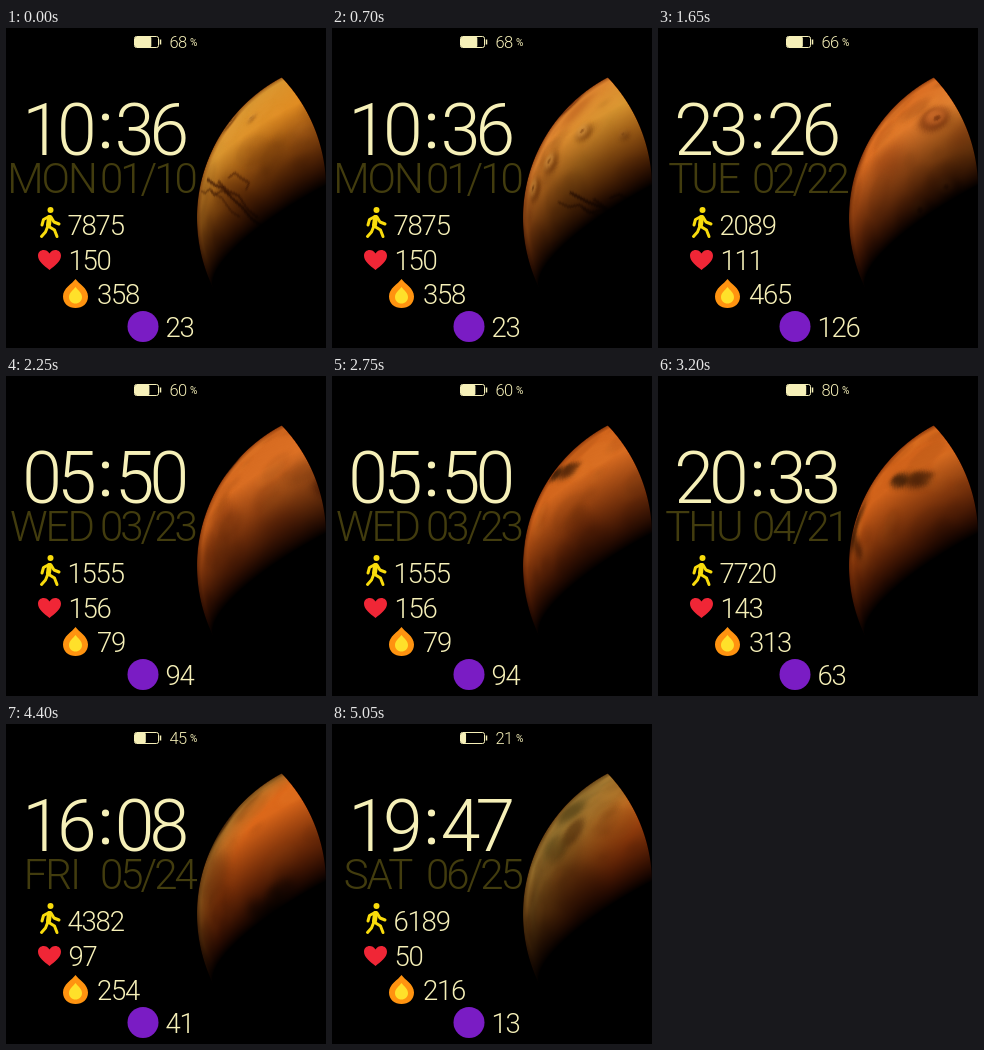
Animation of 320x320 px, one loop 5.1 s. Source, as an HTML page with a canvas:

```html
<!DOCTYPE html>
<html lang="en">
<head>
<meta charset="utf-8">
<title>Watch face</title>
<style>
  html, body { margin: 0; width: 100%; height: 100%; overflow: hidden; background: #000; }
  canvas, svg { position: absolute; left: 0; top: 0; width: 100%; height: 100%; }
  text { font-family: Roboto, "Open Sans", sans-serif; font-weight: 300; fill: #f6f0b8; }
  .time { font-size: 71.5px; letter-spacing: -5px; text-anchor: middle; }
  .date { font-size: 42px; letter-spacing: -3px; fill: #423c0e; }
  .day { letter-spacing: -2px; text-anchor: middle; }
  .stat { font-size: 27.5px; letter-spacing: -1.2px; }
  .small { font-size: 16.5px; letter-spacing: -.6px; }
</style>
</head>
<body>
<canvas id="planet" width="320" height="320"></canvas>
<svg viewBox="0 0 320 320">
  <rect x="128.5" y="8.5" width="24" height="11" rx="2" fill="none" stroke="#f6f0b8"/>
  <path d="M154.500 11.500v5" stroke="#f6f0b8" stroke-width="1.5"/>
  <rect id="charge" x="129" y="9" height="10" rx="1" fill="#f6f0b8"/>
  <text id="battery" class="small" x="163.5" y="20"></text>
  <text x="184" y="18" font-size="10" style="font-weight:400">%</text>

  <text id="hours" class="time" x="51" y="127"></text>
  <g fill="#f6f0b8"><circle cx="99.5" cy="89" r="3.6"/><circle cx="99.5" cy="117" r="3.6"/></g>
  <text id="minutes" class="time" x="143.5" y="127"></text>
  <text id="day" class="date day" x="45.5" y="165"></text>
  <text id="date" class="date" x="94" y="165"></text>

  <g fill="none" stroke="#f9dc0c" stroke-width="3" stroke-linecap="round" stroke-linejoin="round">
    <circle cx="44.5" cy="182" r="3" fill="#f9dc0c" stroke="none"/>
    <path d="M44 188.500L42 198L48.500 202L51 208.500M41.500 199L39.500 204L35.500 208.500M43 188.500L37.500 191.500L36 197M45 189L48 194L53 196"/>
    <path d="M43.500 189.500L42.500 197" stroke-width="5"/>
  </g>
  <path d="M43.500 242C38 237.500 32 233.500 32 227.800C32 221.500 40 219.800 43.500 225.500C47 219.800 55 221.500 55 227.800C55 233.500 49 237.500 43.500 242Z" fill="#f02636"/>
  <path d="M69.500 251C73 256 82 260 82 268.500C82 275.500 76.500 280 69.500 280S57 275.500 57 268.500C57 260 66 256 69.500 251Z" fill="#ff9310"/>
  <path d="M69.500 259C71.500 262 76 264.500 76 269C76 273 73 275.500 69.500 275.500S63 273 63 269C63 264.500 67.500 262 69.500 259Z" fill="#ffe02a"/>
  <circle cx="137" cy="298.500" r="15.500" fill="#7a1cc4"/>

  <text id="steps" class="stat" x="61.5" y="207"></text>
  <text id="pulse" class="stat" x="62.5" y="242"></text>
  <text id="energy" class="stat" x="91" y="276"></text>
  <text id="score" class="stat" x="159.500" y="308.500"></text>
</svg>
<script>
const LOOP = 5100, STEP = 50, HOLD = 1000;
const FIELDS = ['battery', 'hours', 'minutes', 'day', 'date', 'steps', 'pulse', 'energy', 'score'];
const SCREENS = [
  '68 10 36 MON 01/10 7875 150 358 23',
  '66 23 26 TUE 02/22 2089 111 465 126',
  '60 05 50 WED 03/23 1555 156 79 94',
  '80 20 33 THU 04/21 7720 143 313 63',
  '45 16 08 FRI 05/24 4382 97 254 41',
  '21 19 47 SAT 06/25 6189 50 216 13'
].map(line => line.split(' '));
const byId = id => document.getElementById(id);

// Planet geometry: a tilted sphere, spinning in degrees per second.
const CX = 350, CY = 190, R = 159, SPIN = 42, TILT = 20 * Math.PI / 180;
const LIGHT = [-.43, -.86, -.27];
const SCALE = 3, SPAN = 304, MAP_W = SPAN * SCALE, MAP_H = 180 * SCALE;
const clamp = v => Math.max(0, Math.min(1, v));

function surface(x, y) {
  const nx = (x - CX) / R, ny = (y - CY) / R;
  const nz = Math.sqrt(Math.max(0, 1 - nx * nx - ny * ny));
  const along = nx * Math.cos(TILT) + ny * Math.sin(TILT);
  const down = ny * Math.cos(TILT) - nx * Math.sin(TILT);
  const deg = 180 / Math.PI;
  return {
    u: (Math.atan2(along, nz) * deg + SPAN) * SCALE,
    v: (Math.asin(Math.max(-1, Math.min(1, down))) * deg + 90) * SCALE,
    nx, ny, nz
  };
}

function paintMap() {
  const canvas = document.createElement('canvas');
  canvas.width = MAP_W;
  canvas.height = MAP_H;
  const g = canvas.getContext('2d', { willReadFrequently: true });
  let seed = 11;
  const random = () => (seed = seed * 16807 % 2147483647) / 2147483647;

  // Ground colour by the time (seconds) at which it passes the middle of the view.
  const base = g.createLinearGradient(0, 0, MAP_W, 0);
  [[-1, '#c8701c'], [0, '#e08c22'], [.7, '#d89630'], [1.65, '#e08030'], [2.25, '#dc7024'], [3.2, '#d4681e'],
   [3.75, '#d0621a'], [4.7, '#dc681a'], [5.2, '#a87028'], [5.6, '#94702e']]
    .forEach(([t, colour]) => base.addColorStop(clamp(1 - (45 + SPIN * t) / SPAN), colour));
  g.fillStyle = base;
  g.fillRect(0, 0, MAP_W, MAP_H);

  const ellipse = (x, y, rx, ry, colour, blur = 0, turn = 0) => {
    g.filter = blur ? `blur(${blur}px)` : 'none';
    g.fillStyle = colour;
    g.beginPath();
    g.ellipse(x, y, rx, ry, turn, 0, 7);
    g.fill();
  };
  // Places a mark where it is seen on screen at time t (seconds).
  const locate = (t, x, y) => {
    const p = surface(x, y);
    return [p.u - SPIN * t * SCALE, p.v];
  };
  const blot = (t, x, y, rx, ry, colour, blur, turn) =>
    ellipse(...locate(t, x, y), rx * SCALE, ry * SCALE, colour, blur, turn);
  const ridge = (t, points, width, colour) => {
    g.filter = 'blur(.8px)';
    g.strokeStyle = colour;
    g.lineWidth = width;
    g.lineJoin = 'round';
    g.beginPath();
    points.forEach(([x, y]) => g.lineTo(...locate(t, x, y)));
    g.stroke();
  };

  for (let i = 0; i < 500; i++) {
    const size = 3 + random() * 18;
    const tone = random() < .55 ? '80,30,5' : '255,170,70';
    ellipse(random() * MAP_W, random() * MAP_H, size * 1.4, size, `rgba(${tone},.08)`, 3, random() * 3);
  }

  // Canyons
  blot(0, 235, 172, 16, 6, 'rgba(110,45,5,.3)', 7, .2);
  ridge(0, [[201, 151], [209, 157], [217, 160], [226, 170], [236, 179], [246, 191], [262, 203]], 3, 'rgba(70,25,4,.8)');
  ridge(0, [[212, 153], [222, 163], [233, 168], [242, 182], [252, 190]], 2.5, 'rgba(80,30,5,.75)');
  ridge(0, [[222, 150], [229, 145], [235, 150], [243, 155], [240, 162]], 2.5, 'rgba(95,38,6,.65)');
  ridge(0, [[205, 163], [216, 170], [226, 184], [234, 189]], 2, 'rgba(85,34,6,.6)');
  ridge(.7, [[226, 174], [237, 179], [248, 177], [257, 185], [270, 182], [284, 188]], 2.2, 'rgba(80,35,5,.65)');

  // Volcanoes
  for (const [x, y, size] of [[250, 103, 3.6], [217, 133, 4], [201, 160, 4.5], [291, 106, 1.6]]) {
    blot(.7, x + 2, y + 2, size * 1.2, size, 'rgba(110,50,5,.5)', 3);
    blot(.7, x, y, size * .8, size * .75, 'rgba(245,175,80,.65)', 3);
    blot(.7, x, y, size * .25, size * .25, 'rgba(120,60,10,.6)', 1);
  }
  blot(1.65, 276, 91, 7, 5.5, 'rgba(110,40,8,.65)', 4);
  blot(1.65, 277, 89, 5, 3.6, 'rgba(215,115,45,.8)', 3);
  blot(1.65, 279, 90, 1.6, 1.3, 'rgba(110,45,10,.6)', 1);
  blot(1.65, 306, 105, 5, 8, 'rgba(150,55,10,.3)', 8);

  // Plains and dark regions
  blot(2.25, 215, 160, 9, 12, 'rgba(110,35,5,.25)', 10);
  blot(2.25, 275, 150, 10, 7, 'rgba(130,40,5,.25)', 9);
  blot(3.2, 250, 104, 12, 2.6, 'rgba(60,30,8,.7)', 4, -.15);
  blot(3.2, 241, 105, 5, 2.6, 'rgba(50,25,6,.6)', 3);
  blot(3.2, 264, 99, 6, 1.6, 'rgba(55,25,6,.6)', 3, -.2);
  blot(3.75, 303, 122, 4, 2.5, 'rgba(70,28,6,.4)', 4);
  blot(3.75, 225, 147, 4, 5, 'rgba(70,35,8,.5)', 5, .5);
  blot(3.75, 212, 172, 9, 4, 'rgba(55,26,6,.55)', 6);
  blot(3.75, 229, 183, 6, 2.5, 'rgba(60,26,6,.55)', 4, .4);
  blot(3.75, 218, 160, 4, 6, 'rgba(60,30,6,.5)', 4, -.3);
  blot(5.05, 238, 88, 9, 5, 'rgba(70,55,18,.6)', 6, -.3);
  blot(5.05, 241, 108, 5, 6, 'rgba(75,42,10,.6)', 4);
  blot(5.05, 222, 125, 9, 5, 'rgba(75,58,18,.5)', 6);
  blot(5.05, 245, 165, 14, 9, 'rgba(85,35,6,.35)', 9);
  return g.getImageData(0, 0, MAP_W, MAP_H).data;
}

const map = paintMap();
const view = byId('planet').getContext('2d');
const LEFT = 186, TOP = 40, W = 134, H = 270;
const image = view.createImageData(W, H);
const pixels = [];
for (let y = 0; y < H; y++) for (let x = 0; x < W; x++) {
  const px = x + LEFT + .5, py = y + TOP + .5;
  const edge = clamp(R + .5 - Math.hypot(px - CX, py - CY)) * clamp(160.5 - Math.hypot(px - 160, py - 160));
  const p = surface(px, py);
  const lit = Math.max(0, p.nx * LIGHT[0] + p.ny * LIGHT[1] + p.nz * LIGHT[2]);
  const shade = edge * Math.min(1, 1.5 * lit ** .85) * Math.min(1, .55 + p.nz * 2);
  const at = (y * W + x) * 4;
  image.data[at + 3] = 255;
  if (shade > 0) pixels.push({ at, u: p.u, row: Math.min(MAP_H - 1, p.v | 0) * MAP_W, shade });
}

function drawPlanet(seconds) {
  const shift = SPIN * seconds * SCALE;
  for (const { at, u, row, shade } of pixels) {
    const from = (row + Math.max(0, Math.min(MAP_W - 1, (u - shift) | 0))) * 4;
    image.data[at] = map[from] * shade;
    image.data[at + 1] = map[from + 1] * shade ** 1.3;
    image.data[at + 2] = map[from + 2] * shade ** 1.8;
  }
  view.putImageData(image, LEFT, TOP);
}

function showScreen(values) {
  FIELDS.forEach((id, i) => { byId(id).textContent = values[i]; });
  byId('charge').setAttribute('width', 24 * values[0] / 100);
}

let shownStep = -1;
function render(now) {
  const step = Math.floor(now % LOOP / STEP);
  if (step !== shownStep) {
    shownStep = step;
    const time = step * STEP;
    drawPlanet(time / 1000);
    showScreen(SCREENS[Math.floor(time / HOLD)]);
  }
}

const start = performance.now();
function tick() {
  render(performance.now() - start);
  requestAnimationFrame(tick);
}
tick();
</script>
</body>
</html>
```
